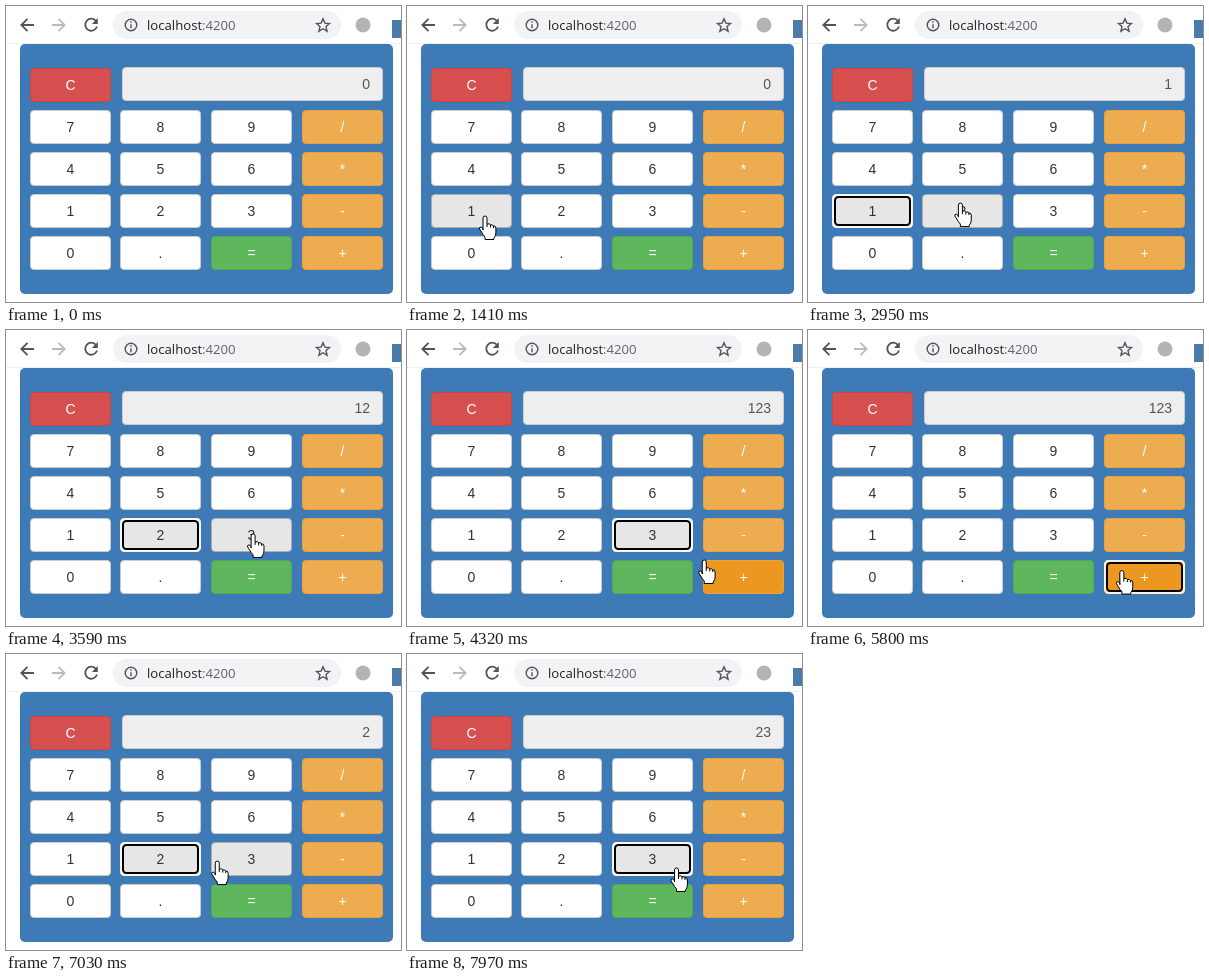
Animation, 395 px wide and 296 px high, one loop 8000 ms. Source, as an HTML page:

```html
<!DOCTYPE html>
<html>
<head>
<meta charset="utf-8">
<style>
  html, body { margin: 0; width: 100%; height: 100%; overflow: hidden; background: #fff; }
  svg { display: block; }
  text { font: 14px "Liberation Sans", Arial, sans-serif; }
  .url { font: 13.15px "Open Sans", sans-serif; }
  .icon { fill: none; stroke: #50555a; stroke-width: 1.8; }
</style>
</head>
<body>
<svg width="395" height="296" viewBox="0 0 395 296">
  <path d="M0 37.5H395" stroke="#eee"/>
  <g class="icon">
    <path d="M28 19H15.5M21.5 12.8L15.3 19l6.2 6.2"/>
    <path d="M46 19h12.5M52.5 12.8l6.2 6.2-6.2 6.2" stroke="#b9bcbf"/>
    <path d="M90 15A6 6 0 1 0 91 20.5"/>
    <path d="M91.8 12v6h-6z" fill="#50555a" stroke="none"/>
  </g>
  <rect x="107" y="5" width="228" height="28" rx="14" fill="#f1f3f4"/>
  <g class="icon" style="stroke-width:1.4">
    <circle cx="125" cy="19" r="5.8"/>
    <path d="M125 18.2v4M125 15.2v1.5"/>
    <path d="M317 12.8l1.9 4.3 4.6.4-3.5 3.1 1.1 4.6-4.1-2.5-4.1 2.5 1.1-4.6-3.5-3.1 4.6-.4z"/>
  </g>
  <text class="url" x="141" y="24" fill="#202124">localhost<tspan fill="#5f6368">:4200</tspan></text>
  <circle cx="357" cy="19" r="7.5" fill="#b4b4b4"/>
  <rect x="386" y="14" width="12" height="18" fill="#4b7ba8"/>

  <rect x="14" y="38" width="373" height="250" rx="5" fill="#3d7ab6"/>
  <rect x="116.5" y="61.5" width="260" height="33" rx="3.5" fill="#eee" stroke="#ccc"/>
  <text id="display" x="364" y="83" text-anchor="end" fill="#555"></text>
  <g id="keys"></g>
  <g id="hand" stroke="#000" stroke-linejoin="round">
    <path fill="#fff" d="M-2 14V2q0-2 2-2t2 2v6q3-1 3.5 1 2.5-.8 3 1 2.2-.5 2.4 2v5q0 3-2 5v1.5H0V21q-2-2-3.5-5l-2-3q-.5-2 1.5-2 1 0 2 2z"/>
    <path fill="none" d="M2 8v3M5.5 9v2.5M8.5 10v2"/>
  </g>
</svg>
<script>
const LOOP = 8000, W = 81, H = 34;
const $ = id => document.getElementById(id);

// normal, hovered and pressed fill, then border and text
const themes = {
  plain: ['#fff', '#e6e6e6', '#d4d4d4', '#ccc', '#333'],
  red: ['#d6504f', '#c9302c', '#ac2925', '#d0433f', '#fff'],
  orange: ['#edac50', '#ec971f', '#d58512', '#eba03a', '#fff'],
  green: ['#5fb75d', '#449d44', '#398439', '#50ab4f', '#fff']
};

function node(parent, tag, attrs) {
  const el = document.createElementNS('http://www.w3.org/2000/svg', tag);
  for (const k in attrs) el.setAttribute(k, attrs[k]);
  return parent.appendChild(el);
}

function box(parent, x, y, inset, attrs) {
  return node(parent, 'rect', {
    x: x + inset, y: y + inset, width: W - 2 * inset, height: H - 2 * inset, rx: 3.5, ...attrs
  });
}

function makeKey(label, col, y) {
  const x = Math.round(23.8 + col * 90.6);
  const theme = themes[label === 'C' ? 'red' : label === '=' ? 'green' : col === 3 ? 'orange' : 'plain'];
  const face = box($('keys'), x, y, .5, { stroke: theme[3] });
  const ring = node($('keys'), 'g', { fill: 'none', 'stroke-width': 2 });
  box(ring, x, y, 1, { stroke: '#fff', opacity: .85 });
  box(ring, x, y, 3, { stroke: '#000' });
  node($('keys'), 'text', { x: x + W / 2, y: y + 22, 'text-anchor': 'middle', fill: theme[4] }).textContent = label;
  return { label, x, y, theme, face, ring };
}

const keys = [makeKey('C', 0, 62)];
['789/', '456*', '123-', '0.=+'].forEach((row, r) =>
  [...row].forEach((label, c) => keys.push(makeKey(label, c, 104 + r * 42))));

// The hand travels to each stop, then presses the key there.
const entry = { x: 92, y: 288 };
const stops = [
  { go: 990, arrive: 1410, x: 78, y: 210, key: '1', press: 2270 },
  { go: 2410, arrive: 3020, x: 153, y: 197, key: '2', press: 3090 },
  { go: 3160, arrive: 3650, x: 248, y: 204, key: '3', press: 3850 },
  { go: 3980, arrive: 4800, x: 319, y: 241.5, key: '+', press: 5330, hold: 200 },
  { go: 5790, arrive: 6550, x: 156, y: 213, key: '2', press: 6620 },
  { go: 6690, arrive: 7440, x: 231, y: 205, key: '3', press: 7640 },
  { go: 7740, arrive: 8100, x: 274, y: 215 }
];

const easeOut = k => 1 - (1 - k) ** 2.2;

function fingertip(t) {
  const i = stops.findLastIndex(s => t >= s.go);
  if (i < 0) return null;
  const from = stops[i - 1] || entry, to = stops[i];
  const k = easeOut(Math.min(1, (t - to.go) / (to.arrive - to.go)));
  return { x: from.x + (to.x - from.x) * k, y: from.y + (to.y - from.y) * k };
}

// Digits append; the first digit after an operator starts a new number.
function calculator(t) {
  let focus, down = false, value = '', fresh = true;
  for (const { key, press, hold = 70 } of stops) {
    if (!key || t < press) break;
    focus = key;
    down = t < press + hold;
    if (down) break;
    if (key !== '+') value = fresh ? key : value + key;
    fresh = key === '+';
  }
  return { focus, down, value: value || '0' };
}

function draw(t) {
  const tip = fingertip(t);
  $('hand').setAttribute('visibility', tip ? 'visible' : 'hidden');
  if (tip) $('hand').setAttribute('transform', `translate(${tip.x} ${tip.y})`);

  const { focus, down, value } = calculator(t);
  $('display').textContent = value;

  for (const { label, x, y, theme, face, ring } of keys) {
    const hover = tip && tip.x >= x && tip.x < x + W && tip.y >= y && tip.y < y + H;
    const focused = label === focus;
    const state = focused && down ? 2 : focused || hover ? 1 : 0;
    face.setAttribute('fill', theme[state]);
    face.setAttribute('stroke', state && theme === themes.plain ? '#adadad' : theme[3]);
    ring.setAttribute('visibility', focused ? 'visible' : 'hidden');
  }
}

const start = performance.now();
function tick() {
  draw((performance.now() - start) % LOOP);
  requestAnimationFrame(tick);
}
tick();
</script>
</body>
</html>
```
